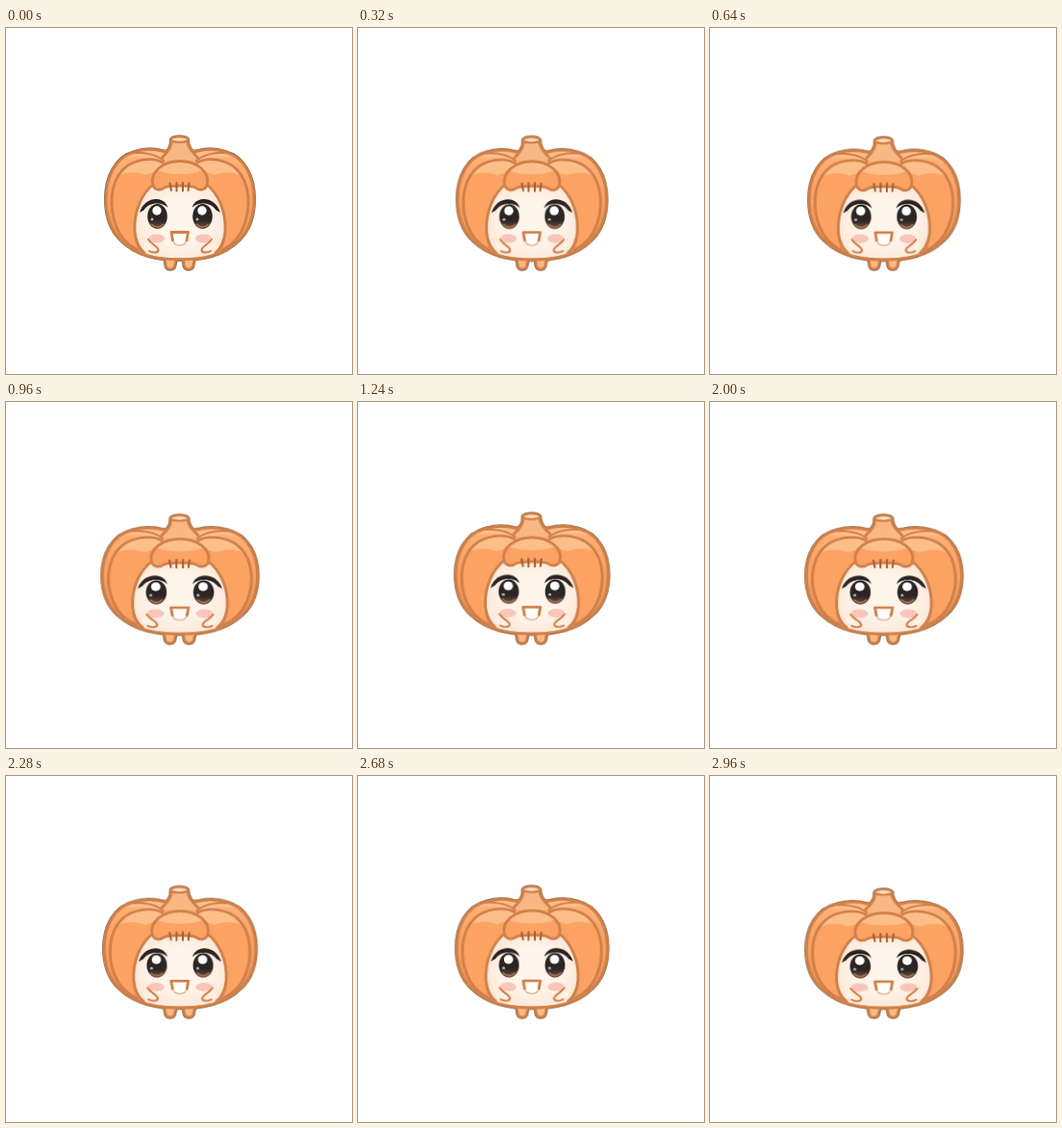
An HTML page without scripts for the animation above (3 s loop, 360 px wide and 360 px high).

```html
<!DOCTYPE html>
<html lang="en">
<head>
<meta charset="utf-8">
<title>Bouncing pumpkin</title>
<style>
  html, body { margin: 0; width: 100%; height: 100%; overflow: hidden; background: #fff; }
  svg { display: block; width: 100vw; height: 100vh; }
  .body { transform-origin: 181px 252.5px; animation: squash 3s infinite; }
  .line { fill: none; stroke: #d08049; stroke-width: 2.8; stroke-linecap: round; stroke-linejoin: round; }
  .thin { stroke-width: 2; }
  .mid { fill: #fca263; }
  .light { fill: #fdbf8a; }
  .edge { fill: #96704f; stroke: #96704f; stroke-width: 4.2; stroke-linejoin: round; }

  /* quick near the tall pose, slow near the wide one */
  @keyframes squash {
    0% { transform: scale(1, 1); animation-timing-function: linear; }
    18.67% { transform: scale(1.008, .994); animation-timing-function: ease-in-out; }
    33.33%, 66.67% { transform: scale(1.048, .9645); animation-timing-function: cubic-bezier(.4, 0, .65, .7); }
    50%, 83.33% { transform: scale(.994, 1.0035); animation-timing-function: cubic-bezier(.35, .3, .6, 1); }
    100% { transform: scale(1.048, .9645); }
  }
</style>
</head>
<body>
<svg viewBox="0 0 360 360">
  <defs>
    <path id="shell" d="M164 128.500C155 126 143 126 134 129C114 134 104 155 104 178C104 196 109 210 119 220C127 228 137 234 148 237C158 240 169 241 181 241C193 241 204 240 214 237C225 234 235 228 243 220C253 210 258 196 258 178C258 155 248 134 228 129C219 126 207 126 198 128.500Z"/>
    <clipPath id="shellClip"><use href="#shell"/></clipPath>
    <path id="stem" d="M172 116C173 123 169 128 162.500 135C169 141 193 141 199.500 135C193 128 188 123 189 116C187 112.500 174 112.500 172 116Z"/>
    <path id="foot" d="M165.500 239L166.500 247C167.500 252 174.500 252 175.500 247L177 239Z"/>
    <path id="lobe" d="M163 140C153 134 133 136 122 147C108 161 107 187 115 207C119 217 127 226 137 231C130 216 131 182 152 160Z"/>
    <clipPath id="lobeClip"><use href="#lobe"/></clipPath>
    <path id="hair" d="M152.500 161C151 149 164 138.500 181 138.500C198 138.500 211 149 209.500 161C209 169.500 201 169.500 197 166C193 163.500 169 163.500 165 166C161 169.500 153 169.500 152.500 161Z"/>
    <clipPath id="hairClip"><use href="#hair"/></clipPath>
    <radialGradient id="skin">
      <stop offset=".6" stop-color="#fff5ea"/>
      <stop offset="1" stop-color="#fdeadb"/>
    </radialGradient>
    <linearGradient id="iris" x2="0" y2="1">
      <stop offset=".65" stop-color="#2b2625"/>
      <stop offset="1" stop-color="#72503f"/>
    </linearGradient>
    <linearGradient id="shade" x2="0" y2="1">
      <stop offset="0" stop-color="#fdb47b"/>
      <stop offset=".4" stop-color="#fba163"/>
      <stop offset="1" stop-color="#e18d52"/>
    </linearGradient>

    <g id="side">
      <path class="light" d="M165 130C150 126 136 128 126 136C137 132 152 135 163 140Z"/>
      <path class="line thin" d="M134 130C145 129 157 132 164 138"/>
      <use href="#lobe" class="mid"/>
      <path class="light" clip-path="url(#lobeClip)" d="M170 130H115L109 160C117 151 132 147 145 153L170 145Z"/>
      <path class="line" d="M163 140C153 134 133 136 122 147C108 161 107 187 115 207C119 217 127 226 137 231"/>
    </g>

    <g id="cheek">
      <path class="line" d="M154 162C140 173 133 192 134 212C135 222 138 229 144 234"/>
      <ellipse cx="156.500" cy="219" rx="8.500" ry="4.600" fill="#f9c5b9"/>
      <path d="M147 220C152 222 159 228 159 231C158 235 152 234 149 232L142 228Z" fill="#fef0e2"/>
      <path class="line thin" d="M148 220C151 225 158 227 158.500 231C158 234.500 152 234 149 232"/>
    </g>

    <g id="eye">
      <ellipse cx="157.500" cy="196" rx="10.300" ry="13" fill="url(#iris)"/>
      <path d="M139 192C142 182 150 177.500 157 178C163 178.500 167 182 168.500 187C163 181.500 150 180 143.500 189.500Z" fill="#2b2422"/>
      <path d="M151 204Q157.500 210 164 204" fill="none" stroke="#a47457" stroke-width="1.600"/>
    </g>
  </defs>

  <g class="body">
    <g class="edge">
      <use href="#shell"/>
      <use href="#stem"/>
      <use href="#foot"/>
      <use href="#foot" x="19"/>
    </g>
    <g fill="#fdb985" stroke="#d08049" stroke-width="2.200">
      <use href="#foot"/>
      <use href="#foot" x="19"/>
    </g>

    <use href="#shell" fill="url(#shade)"/>
    <g clip-path="url(#shellClip)">
      <use href="#side"/>
      <use href="#side" transform="translate(362 0) scale(-1 1)"/>
      <path d="M153 162C140 173 133 192 134 212C135 222 138 229 144 234C158 241 204 241 218 234C224 229 227 222 228 212C229 192 222 173 209 162Z" fill="url(#skin)"/>
    </g>
    <use href="#shell" class="line"/>

    <use href="#stem" fill="#f9b784"/>
    <path class="line" d="M172 116C173 123 169 128 162.500 135M189 116C188 123 193 128 199.500 135"/>
    <ellipse cx="180.500" cy="116" rx="8.600" ry="2.900" fill="#fcdcc0" stroke="#d08049" stroke-width="2.200"/>

    <use href="#cheek"/>
    <use href="#cheek" transform="translate(362 0) scale(-1 1)"/>

    <use href="#hair" class="mid"/>
    <ellipse class="light" clip-path="url(#hairClip)" cx="181" cy="144" rx="27" ry="8"/>
    <use href="#hair" class="line"/>
    <path d="M170.500 161.500L172 169M177.500 161V169.500M184 161V169.500M190.500 161.500L189.500 169" fill="none" stroke="#a9602f" stroke-width="2" stroke-linecap="round"/>

    <use href="#eye"/>
    <use href="#eye" transform="translate(362 0) scale(-1 1)"/>
    <g fill="#fff">
      <circle cx="157" cy="190" r="4.700"/>
      <circle cx="204" cy="190" r="4.700"/>
      <g opacity=".65">
        <circle cx="152" cy="199" r="1.500"/>
        <circle cx="199" cy="199" r="1.500"/>
      </g>
    </g>

    <path d="M172 212.500H189.500C189.500 219 186.500 227 180.700 227C175 227 172 219 172 212.500Z" fill="#fff"/>
    <path class="line" d="M173.500 221L172 212.500H189.500L188 221"/>
    <path d="M174 222C176 227.500 185.500 227.500 187.500 222" fill="none" stroke="#e9b58f" stroke-width="1.500"/>
  </g>
</svg>
</body>
</html>
```
